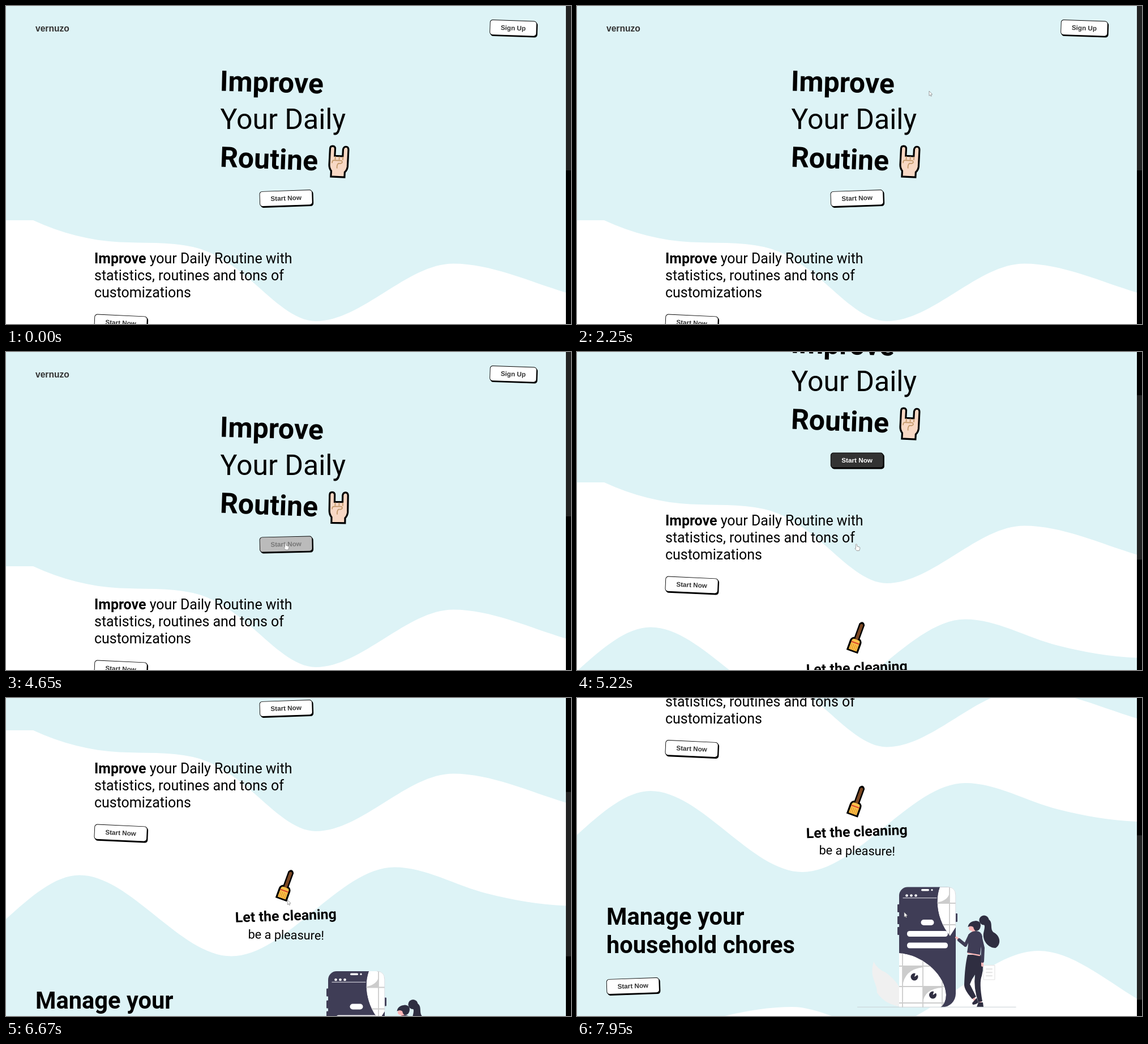
Write an HTML page with a canvas that moves like this. It is 998 px wide and 561 px high and loops after 8 s.

```html
<!DOCTYPE html>
<html lang="en">
<head>
<meta charset="utf-8">
<title>Daily routine page</title>
<style>
html, body { margin: 0; width: 100%; height: 100%; overflow: hidden; background: #fff; }
canvas { display: block; width: 998px; height: 561px; }
</style>
</head>
<body>
<canvas id="stage" width="998" height="561"></canvas>
<script>
const ctx = document.getElementById('stage').getContext('2d');
const W = 998, H = 561, VIEW = 989, LOOP = 8000;
const SKY = '#ddf3f6', NAVY = '#3f3d56', INK = '#2f2e41', PINK = '#ffb8b8', GRID = '#cccccc';
const STEP = 96.75, START = 475;
const LEFT = 52, COLUMN = 156, MIDDLE = 494.6;

// ---- motion: times are counted in refresh steps

const ramp = (n, from, length) => Math.min(1, Math.max(0, (n - from) / length));
const hover = (n, on, off, length) => ramp(n, on, length) - ramp(n, off, length);
const scrollAt = n => 148 * ramp(n, 46, 3) + 111.5 * ramp(n, 49, 5) + 61.5 * ramp(n, 57, 5) + 148.5 * ramp(n, 72, 5);

// Pointer stops: step, x, y
const stops = [[0, 986, 335], [6, 781, 84], [9, 781, 84], [18, 622, 150], [28, 628, 190], [40, 576, 290],
  [43, 493, 337], [51, 493, 339], [54, 513, 337], [68, 491, 364], [77, 578, 378]];

function pointerAt(n) {
  const i = Math.max(1, stops.findIndex(s => s[0] >= n));
  const a = stops[i - 1], b = stops[i], p = ramp(n, a[0], b[0] - a[0]);
  return [a[1] + (b[1] - a[1]) * p, a[2] + (b[2] - a[2]) * p];
}

// ---- drawing helpers

function placed(x, y, deg, draw) {
  ctx.save();
  ctx.translate(x, y);
  ctx.rotate(deg * Math.PI / 180);
  draw();
  ctx.restore();
}

function text(str, x, y, font, color = '#000', align = 'left') {
  ctx.font = font;
  ctx.fillStyle = color;
  ctx.textAlign = align;
  ctx.fillText(str, x, y);
}

const roboto = (size, weight = 400) => `${weight} ${size}px Roboto, sans-serif`;
const arial = size => `700 ${size}px "Liberation Sans", Arial, sans-serif`;

function pill(x, y, w, h, r, fill) {
  ctx.beginPath();
  ctx.roundRect(x, y, w, h, r);
  ctx.fillStyle = fill;
  ctx.fill();
}

function dot(x, y, r, fill) {
  pill(x - r, y - r, r * 2, r * 2, r, fill);
}

function shape(d, fill, stroke, width = 1) {
  const p = new Path2D(d);
  if (fill) { ctx.fillStyle = fill; ctx.fill(p); }
  if (stroke) { ctx.strokeStyle = stroke; ctx.lineWidth = width; ctx.stroke(p); }
}

function limb(d, width, color) {
  ctx.lineCap = ctx.lineJoin = 'round';
  shape(d, null, color, width);
}

// ---- page parts

// Wave nodes: x, y and slope (flat at crests and troughs)
const heroWave = [[48, 378, .46], [200, 416.5, .05], [330, 425, .22], [436, 487, .88], [547, 556], [790, 454.5], [VIEW, 505.5, .3]];
const midWave = [[0, 711, -.9], [130, 633.5], [398, 776.5], [686, 619.5], [850, 666, .25], [VIEW, 687.5, .04]];
const lowWave = [[150, 1062, -.3], [380, 1014.5], [530, 1050], [815, 915.5], [VIEW, 1000, .6]];

function area(nodes, color, edge) {
  ctx.beginPath();
  ctx.moveTo(0, edge);
  ctx.lineTo(0, nodes[0][1]);
  ctx.lineTo(nodes[0][0], nodes[0][1]);
  nodes.slice(1).forEach(([x, y, slope = 0], i) => {
    const [x0, y0, slope0 = 0] = nodes[i], h = (x - x0) / 3;
    ctx.bezierCurveTo(x0 + h, y0 + h * slope0, x - h, y - h * slope, x, y);
  });
  ctx.lineTo(VIEW, edge);
  ctx.fillStyle = color;
  ctx.fill();
}

function waves() {
  ctx.fillStyle = '#fff';
  ctx.fillRect(0, 0, VIEW, 1200);
  area(heroWave, SKY, 0);
  area(midWave, SKY, 1200);
  area(lowWave, '#fff', 1200);
}

function button(label, x, y, w, deg, dark = 0) {
  placed(x, y, deg * (1 - dark), () => {
    const face = Math.round(255 - 204 * dark), ink = Math.round(51 + 204 * dark);
    pill(-w / 2 + 1.5, -11.5, w, 27, 5, '#000');
    pill(-w / 2, -13.5, w, 27, 5, '#000');
    pill(-w / 2 + .9, -12.6, w - 1.8, 25.2, 4.3, `rgb(${face},${face},${face})`);
    text(label, 0, 4, arial(11.7), `rgb(${ink},${ink},${ink})`, 'center');
  });
}

function rockHand(straight) {
  placed(587.3, 274.6, 3 * (1 - straight), () => {
    shape('M-12 27V17Q-16 12 -16 6V-22Q-16 -27 -11.5 -27T-7 -22V-10H7V-22Q8 -27 12 -27T16.5 -22V8Q16 14 12 18V27Z',
      '#f8d8c4', '#000', 3.2);
    shape('M-11 3Q-12 -2 -7 -2H5Q9 1 4 3H0Q-3 6 -2 12', null, '#c49a6c', 1.8);
    for (const x of [-6, 1, 7.5]) shape(`M${x} -9v6`, null, '#c49a6c', 1.8);
  });
}

function brush(turned) {
  placed(495, 651.5, 20 + 25 * turned, () => {
    shape('M-3.4 -24Q0 -30 3.4 -24V2Q9 4 9 9V25H-9V9Q-9 4 -3.4 2Z', '#000', '#000', 3.4);
    pill(-2.6, -25, 5.2, 30, 2.6, '#7b4722');
    pill(-7.4, 4, 14.8, 20, [4, 4, 0, 0], '#fcc24c');
    pill(-7.4, 9, 14.8, 2.2, 0, '#d9472b');
    for (let x = -5; x < 6; x += 3.3) pill(x - .5, 13, 1, 11, 0, '#d98b22');
  });
}

// White map tile with its street grid, kept inside the outline
function mapTile(outline, blocks, xs, ys) {
  ctx.save();
  ctx.clip(new Path2D(outline));
  shape(outline, '#fff');
  shape(blocks, GRID);
  for (const x of xs) pill(x - .9, 330, 1.8, 220, 0, GRID);
  for (const y of ys) pill(565, y - .9, 110, 1.8, 0, GRID);
  ctx.restore();
}

function phone() {
  for (const y of [364, 385, 404]) pill(566, y, 5, 14, 1, NAVY);
  pill(667, 380, 5, 15, 1, NAVY);
  pill(569, 333.5, 100, 212, [15, 15, 24, 15], NAVY);
  ctx.save();
  ctx.clip(new Path2D('M569 333.5H655Q669 333.5 669 348V546H569Z'));
  mapTile('M641 333C631 360 638 395 659 420L670 403V333Z', 'M634 362H658V344Q655 358 634 361Z', [658], [362, 400]);
  mapTile('M569 450C608 452 650 486 652 524Q652 538 642 546H569Z',
    'M575 509Q578 479 611 475V473H575ZM611 538Q613 513 645 511V509H611Z', [575, 611, 645], [473, 509, 538]);
  ctx.restore();
  shape('M655 333.5Q668.7 334 668.7 348V404', null, '#d5d9dd', .8);
  for (const [x, y] of [[596, 492], [628.5, 524]]) {
    dot(x, y, 6.5, INK);
    shape(`M${x} ${y}l2 -7l4 3Z`, '#fff');
  }
  pill(608, 337, 14, 3.4, 1.7, '#fff');
  dot(627, 338.7, 1.6, '#fff');
  for (let i = 0; i < 3; i++) dot(582.5 + i * 8, 348.5, 2.3, '#fff');
  pill(575.5, 352.3, 60, 1, 0, '#e8e8ee');
  pill(607.5, 391, 23, 10, 5, '#fff');
  for (const y of [411, 431.5]) pill(583, y, 72, 10, 4.5, '#fff');
}

function woman() {
  // ponytail, neck, face, hair
  shape('M723 389C738 392 727 409 737 414C750 422 748 437 739 441C728 441 716 430 718 415C720 405 722 400 716 398Z', INK);
  dot(719, 392, 8.6, INK);
  limb('M701 407V413', 7, PINK);
  dot(696.5, 406, 4.6, PINK);
  shape('M690.5 404Q692 394 705 393Q714 394 713 402Q712 411 704 411Q701 409 700 404Q696 401 690.5 404Z', INK);
  // legs and shoes
  limb('M700 528L703 534M712 533L713 539', 4, PINK);
  shape('M690 453H713Q720 472 715 490Q710 502 716 535L709 537Q700 512 703 488Q697 496 694 505L705 527L698 531Q684 515 684 506Q685 472 690 453Z', INK);
  shape('M706 529L709 537Q705 541 699 541L698 538ZM709 537H717L718 545H706Z', INK);
  // paper
  pill(717.5, 471, 21, 26.5, 1, '#e6e6e6');
  pill(718.7, 472.2, 18.6, 24.1, 0, '#fff');
  for (let i = 0; i < 3; i++) pill(722, 477 + i * 6, 12, 2.2, 1, '#e6e6e6');
  // arms and torso
  limb('M674 426L670 422.5M716 465V472', 4, PINK);
  limb('M691 450L711 454', 2.4, PINK);
  limb('M694 419L686 436L675 427M712 420L717 441L716 464', 6, NAVY);
  shape('M691 418Q696 411 705 411T716 421L712 453L689 449Q692 434 691 418Z', NAVY);
}

function scene() {
  shape('M524 465C516 495 530 500 530 520Q545 542 575 545C580 515 562 497 545 484Q530 478 524 465Z', '#f0f0f0');
  phone();
  woman();
  pill(495, 544.8, 280.5, 1, 0, '#c8d0d4');
}

function page(n) {
  waves();
  text('vernuzo', LEFT, 45, arial(15.6), '#333');
  button('Sign Up', 896, 38.8, 83, 2);

  const big = roboto(49.92, 700);
  placed(470, 152, 1.5, () => text('Improve', -92.6, 0, big));
  text('Your Daily', 378.6, 216.5, roboto(49.92));
  placed(466, 287, 2.2, () => text('Routine', -88.6, 0, big));
  rockHand(hover(n, 36, 42, 3));
  button('Start Now', MIDDLE, 339, 93.5, -2, hover(n, 42, 51, 3));

  text('Improve', COLUMN, 454, roboto(24.96, 700));
  const lead = ctx.measureText('Improve').width;
  text(' your Daily Routine with', COLUMN + lead, 454, roboto(24.96));
  text('statistics, routines and tons of', COLUMN, 484, roboto(24.96));
  text('customizations', COLUMN, 514, roboto(24.96));
  button('Start Now', 202.6, 559, 93.5, 2.6);

  brush(hover(n, 64, 72, 3));
  placed(MIDDLE, 713.7, -2, () => text('Let the cleaning', 0, 0, roboto(24.96, 700), '#000', 'center'));
  placed(MIDDLE, 746.3, 1, () => text('be a pleasure!', 0, 0, roboto(21.7), '#000', 'center'));

  text('Manage your', LEFT, 869, roboto(41.6, 700));
  text('household chores', LEFT, 919, roboto(41.6, 700));
  button('Start Now', 98.8, 977.5, 93.5, -2);
  placed(0, 469.5, 0, scene);
}

function pointer(n) {
  const arrow = 'M0 0V8.4L1.9 6.7L3.1 9.3L4.4 8.7L3.2 6.1L5.7 5.9Z';
  const finger = 'M-.8 1Q.4 -.6 1.4 1L1.8 4.4L6 5.6Q7 6 6.8 8L5.6 12H1L-2 8.4Q-1.8 7 -.4 7.8Z';
  placed(...pointerAt(n), 0, () => shape(n >= 42 && n <= 51 ? finger : arrow, '#fff', '#777', .7));
}

function render(t) {
  const n = Math.floor((t - START) / STEP), scroll = scrollAt(n);
  ctx.save();
  ctx.beginPath();
  ctx.rect(0, 0, VIEW, H);
  ctx.clip();
  ctx.translate(0, -scroll);
  page(n);
  ctx.restore();
  pill(VIEW, 0, W - VIEW, H, 0, '#000');
  pill(VIEW, scroll * .516, W - VIEW, 290, 0, '#222');
  if (n >= 0) pointer(n);
}

const begin = performance.now();
function tick() {
  render((performance.now() - begin) % LOOP);
  requestAnimationFrame(tick);
}
tick();
</script>
</body>
</html>
```
